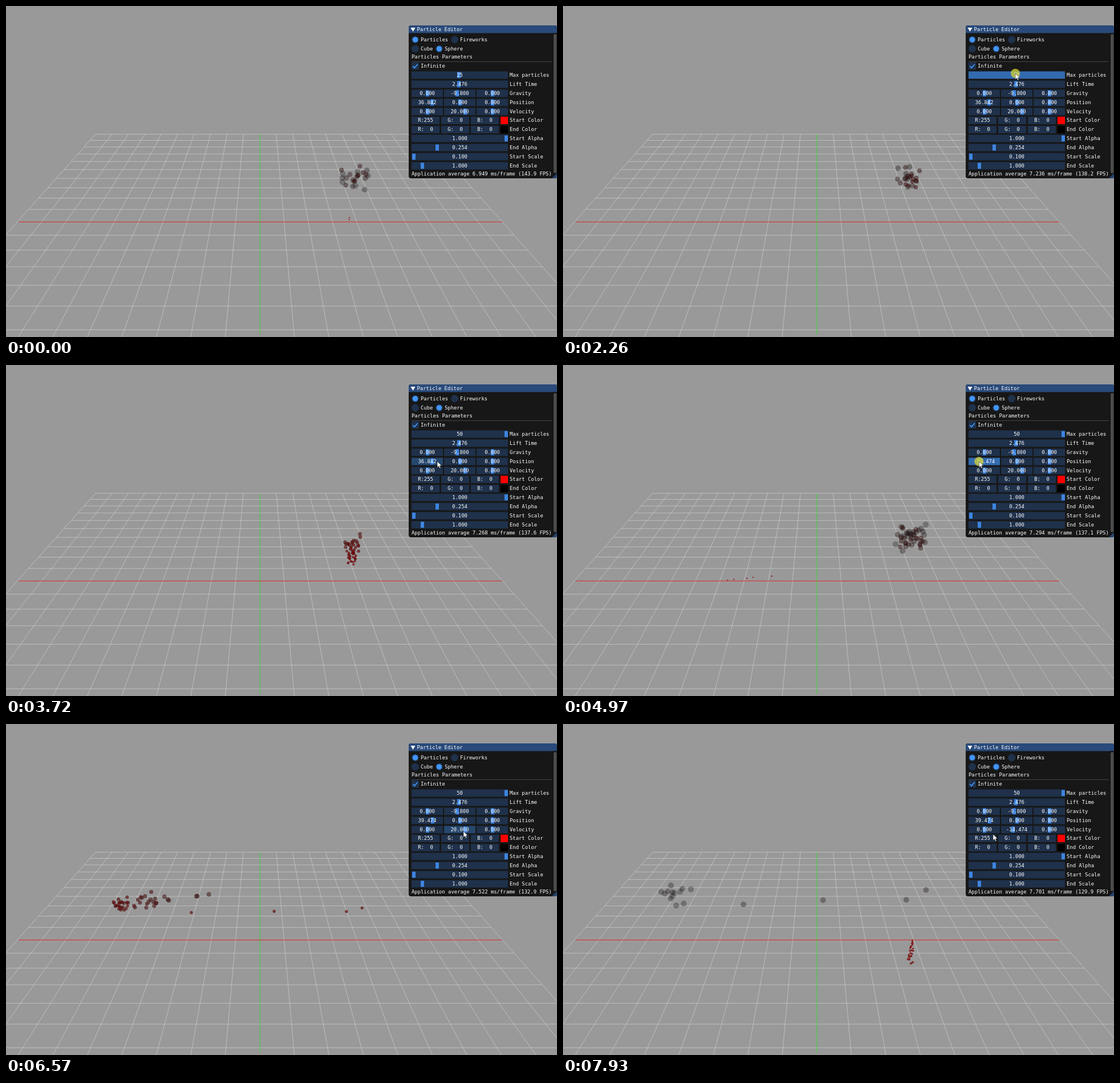
Animation, 966 px wide and 580 px high, one loop 8 s. Source, as an HTML page with a canvas:

```html
<!DOCTYPE html>
<html lang="en">
<head>
<meta charset="utf-8">
<title>Particle Editor</title>
<style>
  html, body { margin: 0; width: 100%; height: 100%; overflow: hidden; background: #999; }
  canvas { display: block; }
</style>
</head>
<body>
<canvas id="stage" width="966" height="580"></canvas>
<script>
const ctx = document.getElementById('stage').getContext('2d');
const LOOP = 8, LIFE = 2.476, GRAVITY = -9.8, SLOTS = 50;
const FRAME = '#1f314b', HOVER = '#26486f', ACTIVE = '#336bb0';
const GRAB = '#3d85e0', BLUE = '#4296fa';

const smooth = u => u * u * (3 - 2 * u);
const easeOut = u => 1 - (1 - u) ** 2;

// Each leg carries the value on to a new one between two times.
function travel(t, from, ...legs) {
  return legs.reduce((value, [start, end, to, ease = smooth]) => {
    const u = Math.min(1, Math.max(0, (t - start) / (end - start)));
    return value + (to - value) * ease(u);
  }, from);
}

const maxAt = t => travel(t, 25, [2.3, 2.75, 50]);
const frameTimeAt = t =>
  travel(t, 6.949, [0, 1.07, 7.52], [1.07, 2.26, 7.236], [2.26, 4.97, 7.294], [4.97, 7.93, 7.701]);
const dragPosition = t =>
  travel(t, 36.842, [4.68, 5.1, -46, easeOut], [5.2, 5.4, -55.263], [5.63, 5.69, 39.474]);
const dragVelocity = t => travel(t, 20, [6.96, 7.28, -14.474]);

// Narrow sliders move in 38 steps to each side.
const stepped = (v, range) => v === 20 ? v : Math.round(v * 38 / range) * range / 38;
const positionAt = t => stepped(dragPosition(t), 100);
const velocityAt = t => stepped(dragVelocity(t), 50);

function activeAt(t) {
  if (t > 2.2 && t < 2.85) return 'max';
  if (t > 4.4 && t < 5.85) return 'position';
  if (t > 6.88 && t < 7.5) return 'velocity';
  return '';
}

function pointerAt(t, active) {
  const x = travel(t, 778, [0.1, 0.85, 796], [1.68, 1.78, 793], [2.3, 2.75, 878],
    [3, 3.85, 748], [5.85, 6.45, 802], [7.5, 7.85, 754]);
  const y = travel(t, 538, [0.1, 0.85, 130.4], [1.68, 1.78, 118], [2.3, 2.75, 124],
    [3, 3.85, 172], [4, 4.3, 169], [5.85, 6.45, 188], [7.5, 7.85, 193.3]);
  const dragged = { position: 738.5 + dragPosition(t) * 0.24, velocity: 795.5 + dragVelocity(t) * 0.48 };
  return { x: dragged[active] || x, y, shown: t > 0.1 };
}

const random = n => { const s = Math.sin(n * 12.9898 + 4.1) * 43758.5453; return s - Math.floor(s); };
const jitter = (n, size) => (random(n) * 2 - 1) * size;

function project(x, y, z) {
  const depth = 190 - y * 0.4335 - z * 0.901;
  return [445 + 807 * x / depth, 290 - 807 * (y * 0.901 - z * 0.4335 - 20.7) / depth];
}

function line(x1, y1, x2, y2, color) {
  ctx.strokeStyle = color;
  ctx.beginPath();
  ctx.moveTo(x1, y1);
  ctx.lineTo(x2, y2);
  ctx.stroke();
}
function rect(x, y, w, h, color) {
  ctx.fillStyle = color;
  ctx.fillRect(x, y, w, h);
}
function rounded(x, y, w, h, radii, color) {
  ctx.fillStyle = color;
  ctx.beginPath();
  ctx.roundRect(x, y, w, h, radii);
  ctx.fill();
}
function circle(x, y, r, color) {
  ctx.fillStyle = color;
  ctx.beginPath();
  ctx.arc(x, y, r, 0, Math.PI * 2);
  ctx.fill();
}
function polygon(points, color) {
  ctx.fillStyle = color;
  ctx.beginPath();
  points.forEach(p => ctx.lineTo(...p));
  ctx.closePath();
  ctx.fill();
}
function text(str, x, y, align = 'left') {
  ctx.fillStyle = '#fff';
  ctx.textAlign = align;
  ctx.fillText(str, x, y + 0.5);
}

function drawGrid() {
  const gray = 'rgba(215,215,215,.58)';
  ctx.lineWidth = 1;
  for (let k = -100; k <= 100; k += 10) {
    if (!k) continue;
    line(...project(k, 0, -100), ...project(k, 0, 100), gray);
    line(...project(-100, 0, k), ...project(100, 0, k), gray);
  }
  line(445, 225, 445, 576, '#38d838');
  line(22, 378.4, 870, 378.4, '#e02a2a');
}

function drawParticle(x, y, f) {
  const r = 1 + 4.3 * f, red = 1 - f, alpha = 1 - 0.746 * f;
  const shade = ctx.createRadialGradient(x, y - r * 0.25, 0, x, y, r);
  shade.addColorStop(0, `rgba(${225 * red},${32 * red},${32 * red},${alpha})`);
  shade.addColorStop(1, `rgba(${110 * red},${8 * red},${8 * red},${alpha})`);
  circle(x, y, r, shade);
}

// Every slot is born again when its particle dies; odd slots join once the maximum is raised.
function drawParticles(t) {
  for (let cycle = -3; cycle < 2; cycle++) {
    for (let slot = 0; slot < SLOTS; slot++) {
      const birth = 4.86 + cycle * LIFE + 0.85 * (slot / SLOTS) ** 0.85;
      const age = t - birth;
      if (age < 0 || age >= LIFE || (birth < 2.3 && slot % 2)) continue;
      const seed = cycle * 211 + slot * 3 + 1;
      const [x, y] = project(
        positionAt(birth) + jitter(seed, 2.6) * age,
        (velocityAt(birth) + jitter(seed + 1, 2)) * age + GRAVITY * age * age / 2,
        jitter(seed + 2, 2) * age);
      drawParticle(x, y, age / LIFE);
    }
  }
}

function drawPanel(t, pointer, active) {
  const inside = (x, y, w) => pointer.shown && pointer.x >= x && pointer.x <= x + w &&
    Math.abs(pointer.y - y) <= 6.5;
  const frame = (x, y, w, id) => {
    const color = active ? (active === id ? ACTIVE : FRAME) : inside(x, y, w) ? HOVER : FRAME;
    rect(x, y - 6.5, w, 13, color);
  };
  const slider = (x, y, w, value, n, id) => {
    frame(x, y, w, id);
    const center = x + w / 2;
    rect(Math.round(center + n * (w - 7) / 2) - 3, y - 5.3, 6, 10.6, active && active === id ? BLUE : GRAB);
    text(value, center, y, 'center');
  };
  const wide = (y, label, value, n, id) => {
    slider(711, y, 169, value, n, id);
    text(label, 883, y);
  };
  const triple = (y, label, values, range, ids = []) => {
    values.forEach((v, i) => slider(711 + 57 * i, y, 55, v.toFixed(3), v / range, ids[i]));
    text(label, 883, y);
  };
  const color = (y, label, red, swatch) => {
    ['R:' + red, 'G:  0', 'B:  0'].forEach((s, i) => {
      frame(711 + 52 * i, y, 49);
      text(s, 735.5 + 52 * i, y, 'center');
    });
    rect(867, y - 6.5, 13, 13, swatch);
    text(label, 883, y);
  };
  const radio = (x, y, label, on) => {
    circle(x, y, 6.5, FRAME);
    if (on) circle(x, y, 4.8, BLUE);
    text(label, x + 9.5, y);
  };

  rounded(706, 34, 260, 268, 4, '#171717');
  rounded(706, 34, 260, 13.5, [4, 4, 0, 0], '#294a7a');
  rect(959, 47.5, 7, 246, '#111');
  rounded(960, 49, 5.5, 244, 2.5, '#4c4c4c');
  polygon([[966, 293], [966, 300], [964, 302], [957, 302]], '#26456f');
  polygon([[709.5, 38], [717.5, 38], [713.5, 45]], '#fff');
  text('Particle Editor', 720.5, 41);

  radio(717.5, 59, 'Particles', true);
  radio(786.5, 59, 'Fireworks', false);
  radio(717.5, 75, 'Cube', false);
  radio(759.5, 75, 'Sphere', true);
  text('Particles Parameters', 711, 89);
  rect(711, 97, 246, 1, '#44444b');
  rect(711, 98.5, 13, 13, FRAME);
  ctx.strokeStyle = BLUE;
  ctx.lineWidth = 1.7;
  ctx.beginPath();
  [[713.2, 105.3], [716.2, 108.4], [721.8, 102]].forEach(p => ctx.lineTo(...p));
  ctx.stroke();
  text('Infinite', 727, 105);

  const max = Math.round(maxAt(t));
  wide(121, 'Max particles', max, (max - 1) / 49 * 2 - 1, 'max');
  wide(137, 'Lift Time', '2.476', -0.02);
  triple(153, 'Gravity', [0, GRAVITY, 0], 50);
  triple(169, 'Position', [positionAt(t), 0, 0], 100, ['position']);
  triple(185, 'Velocity', [0, velocityAt(t), 0], 50, ['', 'velocity']);
  color(200.5, 'Start Color', '255', '#f00');
  color(216.5, 'End Color', '  0', '#000');
  wide(232, 'Start Alpha', '1.000', 1);
  wide(248, 'End Alpha', '0.254', -0.492);
  wide(264, 'Start Scale', '0.100', -0.99);
  wide(280, 'End Scale', '1.000', -0.81);

  const ms = frameTimeAt(t);
  text(`Application average ${ms.toFixed(3)} ms/frame (${(1000 / ms).toFixed(1)} FPS)`, 711, 294);
}

function drawPointer({ x, y, shown }, active) {
  if (!shown) return;
  if (active) circle(x, y, 8, 'rgba(205,205,55,.78)');
  const arrow = [[0, 0], [0, 10.5], [2.5, 8.3], [4.2, 12], [6, 11.2], [4.3, 7.7], [7.6, 7.4]];
  polygon(arrow.map(([dx, dy]) => [x + dx, y + dy]), '#fff');
  ctx.lineWidth = 0.6;
  ctx.strokeStyle = '#222';
  ctx.stroke();
}

function draw(now) {
  const t = now / 1000 % LOOP;
  const active = activeAt(t);
  const pointer = pointerAt(t, active);
  rect(0, 0, 966, 580, '#999');
  ctx.font = '8.9px "DejaVu Sans Mono", monospace';
  ctx.textBaseline = 'middle';
  drawGrid();
  drawParticles(t);
  drawPanel(t, pointer, active);
  drawPointer(pointer, active);
}

const begin = performance.now();
function tick() {
  draw(performance.now() - begin);
  requestAnimationFrame(tick);
}
tick();
</script>
</body>
</html>
```
